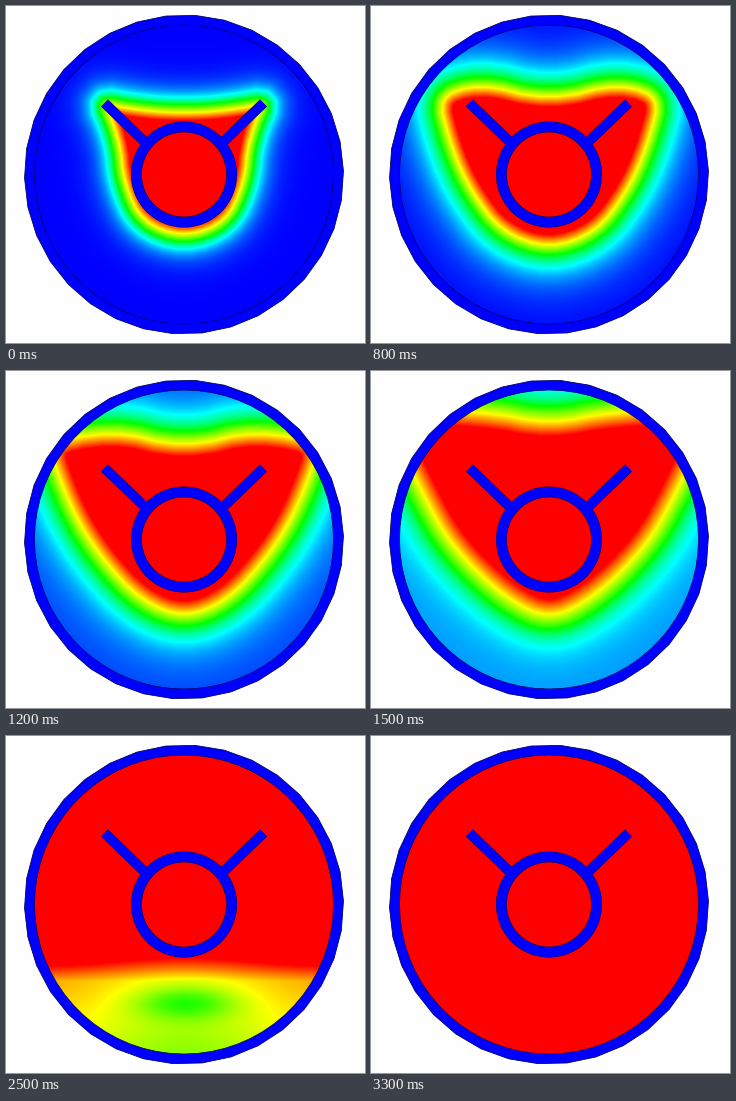
These frames come from a looping animation (359x337 px, 3500 ms). A matplotlib script:

```python
import numpy as np
import matplotlib.pyplot as plt
from matplotlib.animation import FuncAnimation
from matplotlib.colors import LinearSegmentedColormap
from matplotlib.patches import Circle, Polygon

W, H, DPI = 359, 337, 100
CX, CY = 178, 168.5
STEP, FRAMES, KEY_GAP = 100, 35, 500
BLUE, EDGE = "#0000ff", "#000060"
PX = 72 / DPI

# Right half of the half-heat front, from the notch on top to the bottom.
# Points are (distance from the axis, y).
FRONTS = np.array([
    [(0, 99), (40, 97), (92, 88), (72, 135), (68, 178), (48, 222), (0, 240)],
    [(0, 89), (60, 76), (114, 76), (94, 140), (88, 182), (58, 226), (0, 248)],
    [(0, 82), (78, 60), (128, 92), (116, 148), (86, 196), (50, 240), (0, 257)],
    [(0, 38), (60, 26), (190, 20), (140, 130), (108, 186), (52, 240), (0, 264)],
    [(0, -40), (200, -40), (300, 100), (160, 222), (80, 222), (40, 254), (0, 265)],
])
# Width of the hot side, decay length of the cold side, coldest value.
FALLOFF = np.array([(16, 11, 0), (18, 17, 0), (22, 22, 0), (30, 16, 0.15), (37, 14, 0.36)])

# Grid of 2 px cells
X, Y = np.meshgrid(np.arange(1, W + 1, 2), np.arange(1, H + 1, 2))


def mix(a, b, u):
    return a * (1 - u) + b * u


def rounded(pts, passes=2):
    """Chaikin corner cutting on a closed polygon."""
    for _ in range(passes):
        nxt = np.roll(pts, -1, axis=0)
        pts = np.stack([mix(pts, nxt, 0.25), mix(pts, nxt, 0.75)], axis=1).reshape(-1, 2)
    return pts


def depth(pts):
    """Signed distance to a closed polygon, positive inside."""
    best = np.full(X.shape, np.inf)
    inside = np.zeros(X.shape, bool)
    for (ax_, ay), (bx, by) in zip(pts, np.roll(pts, -1, axis=0)):
        ex, ey = bx - ax_, by - ay
        px, py = X - ax_, Y - ay
        s = np.clip((px * ex + py * ey) / (ex * ex + ey * ey), 0, 1)
        best = np.minimum(best, (px - s * ex) ** 2 + (py - s * ey) ** 2)
        if ey:
            inside ^= ((ay > Y) != (by > Y)) & (px < py * ex / ey)
    return np.where(inside, 1, -1) * np.sqrt(best)


def front_field(k, u):
    half = mix(FRONTS[k], FRONTS[k + 1], u)
    hot, decay, cold = mix(FALLOFF[k], FALLOFF[k + 1], u)
    outline = np.concatenate([half, half[-2:0:-1] * (-1, 1)]) + (CX, 0)
    d = depth(rounded(outline))
    warm = np.minimum(0.5 + 0.5 * d / hot, 1.6)
    cool = cold + (0.5 - cold) * np.exp(np.minimum(d, 0) / decay)
    return np.where(d > 0, warm, cool)


def bell(v, center, width):
    return np.exp(-((v - center) / width) ** 2)


LATE = front_field(3, 1)
POOL = (np.interp(Y, [150, 222, 245, 320], [1.5, 1, 0.74, 0.63])
        + 0.1 * (1 - bell(X, CX, 90))
        - 0.18 * bell(X, CX + 2, 50) * bell(Y, 267, 16))
HOT = np.interp(Y, [150, 250, 330], [2, 1.02, 1])


def field(t):
    if t < 2000:
        k, rest = divmod(t, KEY_GAP)
        return front_field(k, rest / KEY_GAP)
    if t < 2500:
        return mix(LATE, POOL, (t - 2000) / 500)
    return mix(POOL, HOT, min((t - 2500) / 800, 1))


def ngon(radius, n, turn=0):
    a = np.arange(n) * 2 * np.pi / n + turn
    return np.column_stack([CX + radius * np.cos(a), CY - radius * np.sin(a)])


fig = plt.figure(figsize=(W / DPI, H / DPI), dpi=DPI, facecolor="#fefefe")
ax = fig.add_axes([0, 0, 1, 1])
ax.axis("off")

ax.add_patch(Polygon(ngon(159.5, 34, 1.5), fc=BLUE, ec=EDGE, lw=0.8 * PX))
rainbow = LinearSegmentedColormap.from_list(
    "heat", ["#0000ff", "#00ffff", "#00ff00", "#ffff00", "#ff0000"], N=512)
heat = ax.imshow(field(0), cmap=rainbow, vmin=0, vmax=1, zorder=2,
                 extent=(0, W + 1, H + 1, 0), interpolation="bilinear")
wall = Polygon(ngon(149.5, 68), fc="none", ec=EDGE, lw=0.7 * PX, zorder=3)
ax.add_patch(wall)
heat.set_clip_path(wall)

for color, grow, z in ((EDGE, 0.5, 4), (BLUE, 0, 5)):
    for side in (-1, 1):
        ax.plot([CX + side * 79.5, CX + side * 38], [97, 137], color=color,
                lw=(9 + 2 * grow) * PX, solid_capstyle="butt", zorder=z)
    ax.add_patch(Circle((CX, CY), 52.5 + grow, fc=color, ec="none", zorder=z))
ax.add_patch(Circle((CX, CY), 42.5, fc="#ff0000", ec=EDGE, lw=0.7 * PX, zorder=6))

ax.set_xlim(0, W)
ax.set_ylim(H, 0)
ax.set_aspect("auto")


def draw(i):
    heat.set_data(field(i * STEP))
    return (heat,)


anim = FuncAnimation(fig, draw, frames=FRAMES, interval=STEP,
                     repeat=True, repeat_delay=0, blit=False)
plt.show()
```
